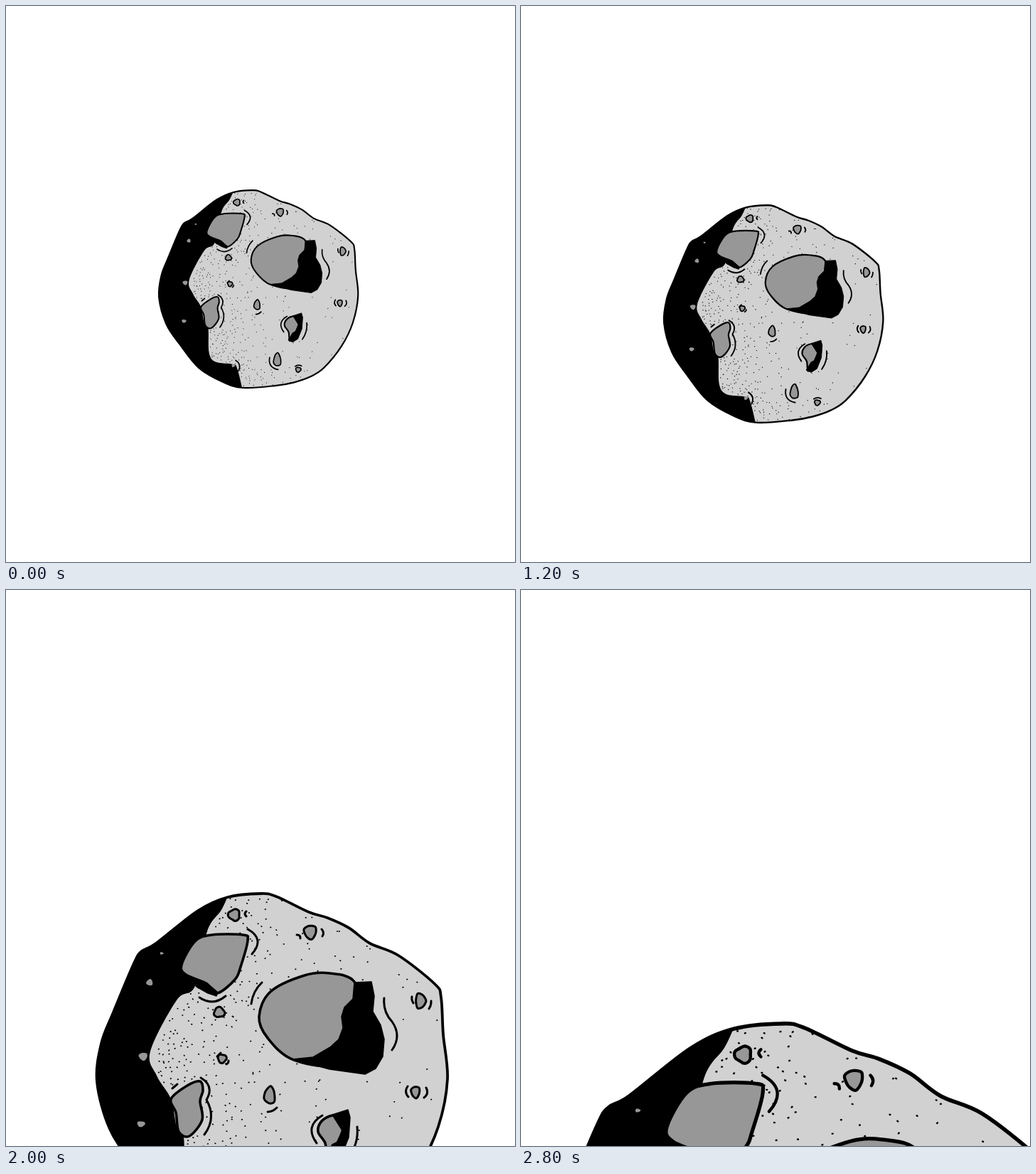
An HTML page with a canvas for the animation above (3000 ms loop, 716 px wide and 782 px high).

```html
<!DOCTYPE html>
<html lang="en">
<head>
<meta charset="utf-8">
<title>Falling moon</title>
<style>
html, body { margin: 0; width: 100%; height: 100%; overflow: hidden; background: #fff; }
canvas { display: block; }
</style>
</head>
<body>
<canvas id="stage" width="716" height="782"></canvas>
<script>
const ctx = document.getElementById('stage').getContext('2d');
const LIGHT = '#d1d1d1', DARK = '#979797', INK = '#000';
const STEP = 200, UNIT = 1.76, LEFT = 126, TOP = 425;

// scale, left and top of the moon at each step
const poses = [
  [1, 214, 258], [1, 226, 252], [1, 214, 258], [1, 215, 261], [1, 220, 256],
  [1, 216, 248], [1.1, 200, 279], [1.213, 180, 309], [1.333, 176, 327], [1.465, 138, 365],
  [1.76, 126, 425], [1.935, 43, 460], [2.11, 49, 506], [2.33, -6, 562], [2.56, 29, 607]
];

// smooth curve through flat x, y pairs
function curve(p, closed) {
  const path = new Path2D(), n = p.length / 2;
  const at = i => {
    i = closed ? (i + n) % n : Math.max(0, Math.min(n - 1, i));
    return [p[2 * i], p[2 * i + 1]];
  };
  path.moveTo(p[0], p[1]);
  for (let i = 0; i < (closed ? n : n - 1); i++) {
    const a = at(i - 1), b = at(i), c = at(i + 1), d = at(i + 2);
    path.bezierCurveTo(
      b[0] + (c[0] - a[0]) / 6, b[1] + (c[1] - a[1]) / 6,
      c[0] - (d[0] - b[0]) / 6, c[1] - (d[1] - b[1]) / 6, c[0], c[1]);
  }
  if (closed) path.closePath();
  return path;
}
const shape = p => curve(p, true);

// lumpy pebble
function pebble(x, y, rx, ry, turn) {
  const p = [];
  for (let i = 0; i < 9; i++) {
    const a = i / 9 * Math.PI * 2, r = 1 + .13 * Math.cos(3 * a + turn);
    p.push(x + rx * r * Math.cos(a), y + ry * r * Math.sin(a));
  }
  return shape(p);
}

const outline = shape([
  312, 432, 358, 427, 380, 431, 426, 453, 452, 461, 482, 475, 512, 497, 552, 514,
  603, 554, 612, 573, 615, 625, 621, 688, 608, 755, 580, 813, 537, 866, 504, 888,
  461, 903, 415, 911, 336, 916, 287, 902, 226, 866, 180, 809, 146, 758, 128, 692,
  134, 638, 151, 594, 180, 525, 191, 508, 211, 497, 270, 451
]);

const edge = [
  314, 426, 303, 450, 283, 480, 266, 557, 240, 577, 203, 649, 212, 683, 232, 716,
  240, 755, 250, 770, 252, 829, 268, 852, 312, 858, 322, 869, 336, 925
];
const shade = curve(edge, false);
shade.lineTo(60, 960);
shade.lineTo(60, 400);
shade.closePath();

const bowls = [
  shape([247, 527, 266, 494, 290, 485, 333, 485, 340, 493, 330, 530, 322, 548, 297, 567, 281, 553, 253, 541]),
  shape([356, 600, 372, 565, 420, 542, 455, 539, 490, 551, 500, 600, 470, 665, 405, 661, 368, 630]),
  shape([232, 716, 255, 697, 273, 691, 277, 704, 273, 719, 276, 745, 258, 768, 243, 762, 239, 735]),
  shape([439, 762, 444, 747, 459, 739, 473, 743, 473, 762, 453, 800, 449, 778])
];

function patch(p) {
  const path = new Path2D();
  for (let i = 0; i < p.length; i += 2) path.lineTo(p[i], p[i + 1]);
  path.closePath();
  return path;
}
const shadows = [
  patch([490, 552, 514, 551, 518, 571, 516, 593, 527, 612, 532, 632, 530, 656, 520, 673, 505, 681,
    455, 674, 403, 660, 432, 657, 456, 643, 468, 632, 474, 616, 472, 600, 476, 587, 488, 575]),
  patch([459, 738, 481, 731, 484, 742, 482, 770, 472, 795, 459, 803, 448, 798, 459, 780, 467, 776, 473, 760]),
  patch([258, 545, 283, 553, 298, 566, 296, 571, 284, 567, 268, 558])
];

const pebbles = [
  pebble(321, 457, 8, 8, 3), pebble(428, 481, 8.5, 9.5, 2), pebble(583, 578, 7, 10.5, 0),
  pebble(300, 594, 7.5, 7, 5), pebble(304, 659, 6, 6, 1), pebble(371, 711, 7.5, 12, 4),
  pebble(576, 706, 6, 8, 2), pebble(421, 847, 9, 16, 4.5), pebble(473, 871, 6.5, 6, 1)
];
const chips = [
  pebble(202, 552, 4.5, 4.5, 4), pebble(219, 511, 2.5, 1.7, 0), pebble(193, 656, 6, 5.5, 2),
  pebble(190, 751, 5.5, 4, 1), pebble(312, 861, 4, 4, 0), pebble(260, 839, 2.5, 2.5, 0)
];

const ripples = new Path2D();
function ripple(x1, y1, x2, y2, bow) {
  const dx = x2 - x1, dy = y2 - y1, k = 2 * bow / Math.hypot(dx, dy);
  ripples.moveTo(x1, y1);
  ripples.quadraticCurveTo((x1 + x2) / 2 + dy * k, (y1 + y2) / 2 - dx * k, x2, y2);
}
ripple(340, 477, 346, 512, 11);
ripple(272, 573, 309, 571, -7);
ripple(360, 552, 345, 582, -3);
ripple(532, 574, 543, 607, -4);
ripple(543, 607, 543, 647, 7);
ripple(274, 686, 282, 717, 8);
ripple(282, 717, 279, 766, 8);
ripple(234, 701, 241, 695, 0);
ripple(445, 739, 437, 778, -11);
ripple(494, 755, 483, 796, 4);
ripple(338, 452, 338, 459, -2);
ripple(409, 485, 414, 490, 2);
ripple(444, 477, 445, 487, 2);
ripple(571, 572, 573, 581, -1);
ripple(598, 578, 595, 589, 1);
ripple(297, 656, 302, 651, 0);
ripple(313, 662, 310, 667, 1);
ripple(368, 734, 381, 728, -1.5);
ripple(565, 698, 566, 713, -3);
ripple(591, 700, 588, 714, 3);
ripple(402, 841, 423, 871, -9);
ripple(465, 863, 481, 862, 2.5);
ripple(318, 848, 325, 874, 6);

function edgeX(y) {
  let i = 0;
  while (i < edge.length - 4 && edge[i + 3] < y) i += 2;
  const k = (y - edge[i + 1]) / (edge[i + 3] - edge[i + 1]);
  return edge[i] + (edge[i + 2] - edge[i]) * k;
}

// stipple thins out away from the shadow
let seed = 7;
function rnd() {
  seed = (seed * 16807) % 2147483647;
  return seed / 2147483647;
}
const dots = new Path2D();
for (let gy = 432; gy < 912; gy += 8) {
  for (let gx = 200; gx < 620; gx += 8) {
    const x = gx + rnd() * 8, y = gy + rnd() * 8, keep = rnd(), lean = rnd() - .5;
    const d = x - edgeX(y);
    if (d > 3 && keep < .78 * Math.exp(-d / 72) + .035) {
      dots.moveTo(x, y);
      dots.lineTo(x + .5, y + lean);
    }
  }
}

function fill(path, color) {
  ctx.fillStyle = color;
  ctx.fill(path);
}
function ink(path, width) {
  ctx.lineWidth = width;
  ctx.stroke(path);
}
function hollow(path, width) {
  fill(path, DARK);
  ink(path, width);
}

function drawMoon([scale, x, y]) {
  ctx.setTransform(1, 0, 0, 1, 0, 0);
  ctx.fillStyle = '#fff';
  ctx.fillRect(0, 0, 716, 782);
  ctx.translate(x, y);
  ctx.scale(scale / UNIT, scale / UNIT);
  ctx.translate(-LEFT, -TOP);
  ctx.lineCap = ctx.lineJoin = 'round';
  ctx.strokeStyle = INK;

  fill(outline, LIGHT);
  ctx.save();
  ctx.clip(outline);
  ink(dots, 1.7);
  fill(shade, INK);
  ctx.restore();
  ink(outline, 3.8);

  bowls.forEach(b => hollow(b, 3.6));
  shadows.forEach(s => {
    fill(s, INK);
    ink(s, 1.5);
  });
  pebbles.forEach(p => hollow(p, 3));
  chips.forEach(c => fill(c, DARK));
  ink(ripples, 3);
}

let shown = -1;
function tick() {
  const step = Math.floor(performance.now() / STEP) % poses.length;
  if (step !== shown) drawMoon(poses[shown = step]);
  requestAnimationFrame(tick);
}
tick();
</script>
</body>
</html>
```
